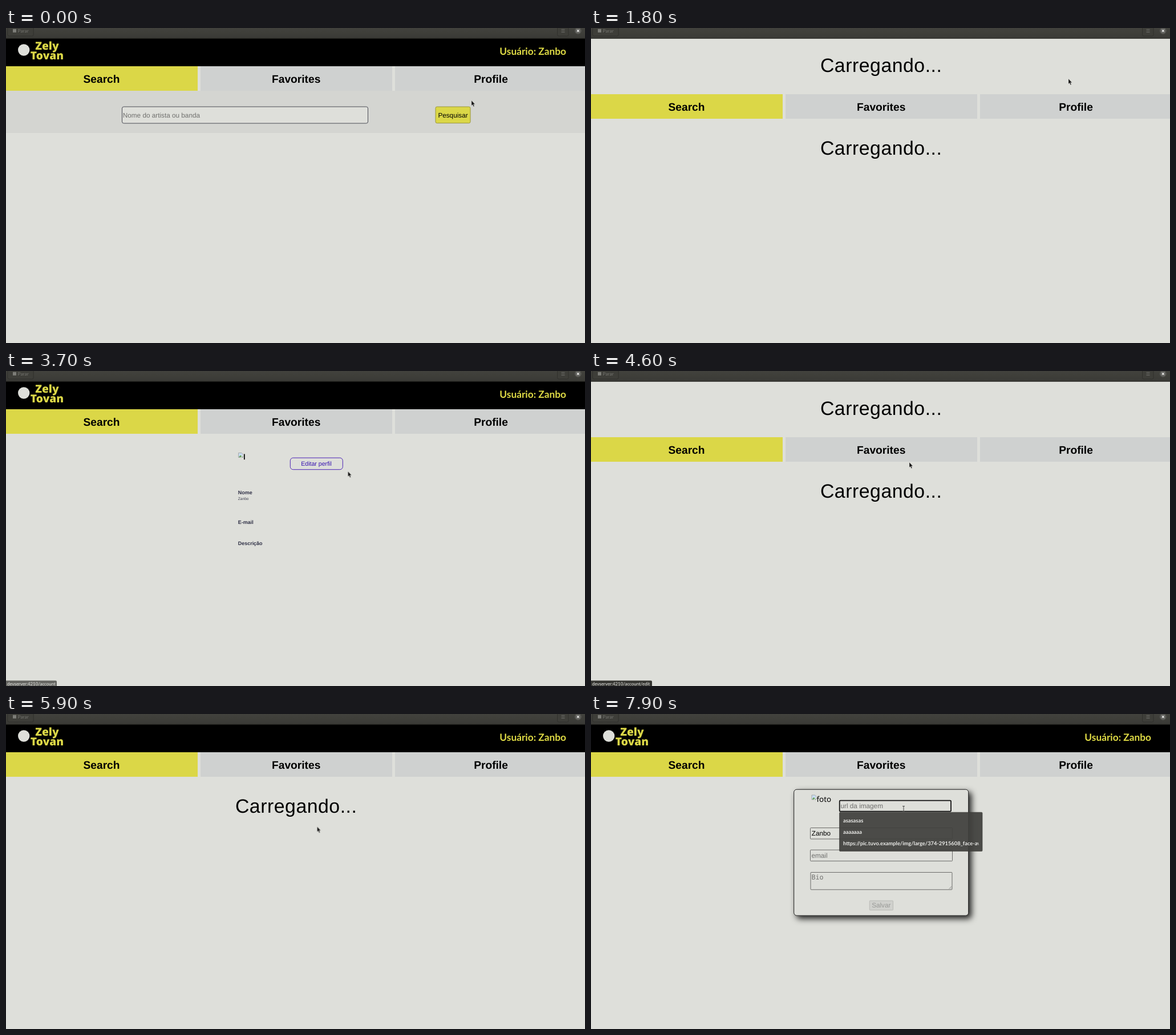
Recreate the animation shown at these times as an HTML page. Size 1015 by 552 pixels, loop 8000 ms.

```html
<!DOCTYPE html>
<html lang="pt">
<head>
<meta charset="utf-8">
<title>Perfil</title>
<style>
  html, body { margin: 0; width: 100%; height: 100%; overflow: hidden; background: #dedfda; }
  svg { display: block; width: 1015px; height: 552px; }
  text { font-family: "Liberation Sans", Arial, sans-serif; text-rendering: geometricPrecision; }
  .mid { text-anchor: middle; }
  .ui { font-family: Lato, "Open Sans", sans-serif; }
  .mark { font: 800 19.2px "Open Sans", sans-serif; fill: #dbd747; }
  .tab { font-size: 19.2px; font-weight: 700; }
  .loading { font-size: 33.8px; letter-spacing: .53px; }
  .field { font-size: 11.75px; }
  .hint { fill: #70706e; }
  .box { fill: none; stroke: #6b6b69; }
  .label { font-size: 8.95px; font-weight: 700; fill: #2e2f45; }
  .tip { font-size: 7.9px; fill: #ededeb; }
  .option { font-size: 9.3px; font-weight: 700; fill: #efefed; }
  .card { filter: drop-shadow(5.3px 5.3px 5.3px rgba(0, 0, 0, .85)); }

  /* One shared 8 s clock; 1.25% is 100 ms. */
  .anim { animation: 8s step-end infinite; }
  #header { animation-name: header; }
  #page { animation-name: page; }
  #wait-top { animation-name: waitTop; }
  #wait-page { animation-name: waitPage; }
  #search { animation-name: search; }
  #profile { animation-name: profile; }
  #edit { animation-name: edit; }
  #cover { animation-name: cover; }
  #block { animation-name: block; }
  #tip-profile { animation-name: tipProfile; }
  #tip-edit { animation-name: tipEdit; }
  #focus { animation-name: focus; }
  #caret { animation-name: caret; }
  #list { animation-name: list; }
  #pointer { animation-name: move; }
  #arrow { animation-name: arrow; }
  #beam { animation-name: beam; }

  @keyframes header { 0%, 35%, 73.75% { opacity: 1 } 17.5%, 57.5% { opacity: 0 } }
  @keyframes page {
    0%, 35%, 73.75% { transform: translateY(0) }
    17.5%, 57.5% { transform: translateY(49px) }
  }
  @keyframes waitTop { 0%, 35%, 73.75% { opacity: 0 } 17.5%, 57.5% { opacity: 1 } }
  @keyframes waitPage { 0%, 36.25%, 75% { opacity: 0 } 17.5%, 57.5% { opacity: 1 } }
  @keyframes search { 0% { opacity: 1 } 17.5%, 100% { opacity: 0 } }
  @keyframes profile { 0%, 57.5% { opacity: 0 } 36.25% { opacity: 1 } }
  @keyframes edit { 0% { opacity: 0 } 75%, 100% { opacity: 1 } }
  @keyframes cover { 0%, 82.5% { opacity: 0 } 75% { opacity: 1 } }
  @keyframes block {
    0% { x: 40px; width: 0 }
    78.75% { x: 40px; width: 9px }
    80% { x: 40px; width: 26.5px }
    81.25% { x: 40px; width: 64px }
    82.5% { x: 91px; width: 13px }
    85% { x: 98px; width: 6px }
    86.25%, 100% { x: 104px; width: 0 }
  }
  @keyframes tipProfile {
    0% { opacity: 0 } 3.75% { opacity: .2 } 5% { opacity: .45 } 6.25% { opacity: .7 }
    7.5% { opacity: .9 } 8.75% { opacity: 1 }
    20% { opacity: .7 } 21.25% { opacity: .35 } 22.5% { opacity: 0 }
    35% { opacity: .25 } 36.25% { opacity: .5 } 37.5% { opacity: .8 } 38.75% { opacity: 1 }
    46.25% { opacity: .72 } 47.5% { opacity: .35 } 48.75%, 100% { opacity: 0 }
  }
  @keyframes tipEdit {
    0%, 61.25% { opacity: 0 }
    48.75% { opacity: .45 } 50% { opacity: .8 } 51.25% { opacity: 1 }
  }
  @keyframes focus { 0% { opacity: 0 } 85%, 100% { opacity: 1 } }
  @keyframes caret { 0%, 90% { opacity: 0 } 85% { opacity: 1 } }
  @keyframes list { 0% { opacity: 0 } 85% { opacity: .5 } 86.25% { opacity: 1 } 98.75%, 100% { opacity: .93 } }
  @keyframes arrow { 0% { opacity: 1 } 80%, 100% { opacity: 0 } }
  @keyframes beam { 0% { opacity: 0 } 80%, 100% { opacity: 1 } }
  @keyframes move {
    0% { transform: translate(816px, 127px) }
    1.25% { transform: translate(820px, 116.5px) }
    3.75% { transform: translate(823px, 107px) }
    5% { transform: translate(828px, 100px) }
    6.25% { transform: translate(832px, 95px) }
    7.5% { transform: translate(835px, 91px) }
    8.75% { transform: translate(837px, 89px) }
    42.5% { transform: translate(760px, 130px) }
    43.75% { transform: translate(663px, 186px) }
    46.25% { transform: translate(599.5px, 176px) }
    47.5% { transform: translate(583px, 169px) }
    48.75% { transform: translate(570px, 164px) }
    50% { transform: translate(560px, 161px) }
    51.25% { transform: translate(554px, 159px) }
    55% { transform: translate(558px, 160px) }
    61.25% { transform: translate(538px, 176px) }
    63.75% { transform: translate(539px, 180px) }
    65% { transform: translate(540px, 185px) }
    66.25% { transform: translate(540.5px, 189px) }
    67.5% { transform: translate(541px, 192px) }
    73.75% { transform: translate(545.5px, 197.5px) }
    76.25% { transform: translate(546px, 194px) }
    77.5% { transform: translate(546px, 188px) }
    78.75% { transform: translate(546px, 183px) }
    80% { transform: translate(546px, 178.5px) }
    81.25% { transform: translate(547px, 168px) }
    82.5% { transform: translate(547px, 159px) }
    88.75% { transform: translate(548px, 162px) }
    90% { transform: translate(548px, 164px) }
    91.25%, 100% { transform: translate(548px, 166px) }
  }
</style>
</head>
<body>
<svg viewBox="0 0 1015 552">
  <defs>
    <linearGradient id="chrome" x2="0" y2="1">
      <stop stop-color="#42423d"/><stop offset="1" stop-color="#3a3a36"/>
    </linearGradient>
    <g id="broken">
      <path d="M.5 .5H6L8.5 3V8.500H.5Z" fill="#c9dcf0" stroke="#9b9d9c" stroke-width=".8"/>
      <path d="M1 8L4 4.500L8 8Z" fill="#5fa04f"/>
      <path d="M8.800 4.200L4.500 9" stroke="#dedfda" stroke-width="1.200"/>
    </g>
    <clipPath id="list-clip"><rect x="436" y="173" width="243.500" height="67"/></clipPath>
  </defs>

  <rect width="1015" height="552" fill="#dedfda"/>

  <g id="header" class="anim">
    <rect y="18" width="1015" height="49" fill="#000"/>
    <circle cx="31.200" cy="38.500" r="10.200" fill="#dedfda"/>
    <text class="mark mid" x="72" y="38">Zely</text>
    <text class="mark mid" x="72" y="55">Tovan</text>
    <rect id="cover" class="anim" x="40" y="19" width="64" height="44" fill="#000"/>
    <rect id="block" class="anim" x="40" y="19" width="0" height="39.500" fill="#dbd747"/>
    <text class="ui" x="982" y="46.500" text-anchor="end" font-size="17.300" font-weight="700" fill="#dfdb45">Usuário: Zanbo</text>
  </g>

  <text id="wait-top" class="anim loading" x="401.900" y="77">Carregando...</text>

  <g id="page" class="anim">
    <rect y="67" width="336" height="43" fill="#dbd747"/>
    <rect x="341" y="67" width="336" height="43" fill="#cfd1d0"/>
    <rect x="682" y="67" width="333" height="43" fill="#cfd1d0"/>
    <text class="tab mid" x="167.500" y="95.600">Search</text>
    <text class="tab mid" x="508.700" y="95.600">Favorites</text>
    <text class="tab mid" x="850" y="95.600">Profile</text>
    <text id="wait-page" class="anim loading" x="401.900" y="173">Carregando...</text>
  </g>

  <g id="search" class="anim">
    <rect y="110" width="1015" height="74" fill="#d4d5d1"/>
    <rect x="203.500" y="138" width="431" height="29" rx="3" fill="#dedfda" stroke="#4b4c55"/>
    <text class="field hint" x="204.800" y="156.500">Nome do artista ou banda</text>
    <rect x="753" y="138" width="61" height="28.700" rx="2.500" fill="#dbd747" stroke="#98963c"/>
    <text class="field mid" x="783.500" y="156.500">Pesquisar</text>
  </g>

  <g id="profile" class="anim">
    <use href="#broken" x="407" y="143"/>
    <rect x="417" y="145.500" width="1.700" height="9.700"/>
    <rect x="498.300" y="152.200" width="92" height="20.500" rx="5" fill="none" stroke="#4a20b4"/>
    <text class="mid" x="544" y="165.800" font-size="10.600" fill="#3510b0">Editar perfil</text>
    <text class="label" x="406.800" y="215.500">Nome</text>
    <text x="406.800" y="226" font-size="6.600" fill="#3b3c4c">Zanbo</text>
    <text class="label" x="406.800" y="267.900">E-mail</text>
    <text class="label" x="406.800" y="305.300">Descrição</text>
  </g>

  <g id="edit" class="anim">
    <rect class="card" x="355.700" y="132.200" width="306" height="221" rx="5" fill="#dedfda" stroke="#1d1d1d"/>
    <use href="#broken" x="386.500" y="141.500"/>
    <text x="395.500" y="154" font-size="13.400" style="font-family:'Noto Sans','Open Sans',sans-serif">foto</text>

    <rect class="box" x="435.700" y="151.500" width="195.500" height="19.500" rx="1"/>
    <text class="field hint" x="437.500" y="165">url da imagem</text>
    <rect class="box" x="384.500" y="199.500" width="249" height="19.500" rx="1"/>
    <text class="field" x="386.800" y="213.200">Zanbo</text>
    <rect class="box" x="384.500" y="238.200" width="249" height="19.500" rx="1"/>
    <text class="field hint" x="386.500" y="251.800">email</text>
    <rect class="box" x="385" y="277.500" width="248" height="30.300" rx="1"/>
    <text class="hint" x="386.500" y="290" font-size="11.700" style="font-family:'DejaVu Sans Mono',monospace">Bio</text>
    <path d="M627.500 306.500L632 302M630 306.500L632 304.500" stroke="#777" stroke-width=".7"/>
    <rect x="488.300" y="327.200" width="41.200" height="16.500" rx="1" fill="#d0d1cd" stroke="#b9bab6"/>
    <text class="field mid" x="508.800" y="339.300" fill="#999a97">Salvar</text>

    <g id="focus" class="anim">
      <rect x="435.700" y="151.700" width="195.300" height="19" rx="1.500" fill="none" stroke="#101010" stroke-width="1.700"/>
      <rect id="caret" class="anim" x="437.700" y="154.500" width=".8" height="13.500"/>
    </g>
  </g>

  <g id="pointer" class="anim">
    <path id="arrow" class="anim" d="M0 0V9L2 7.200L3.500 10.700L5 10L3.500 6.700H6.200Z" fill="#161616" stroke="#d8d8d4" stroke-width=".4"/>
    <path id="beam" class="anim" d="M-2 -4.500H2M0 -4.500V4.500M-2 4.500H2" fill="none" stroke="#3c3c3a" stroke-width=".9"/>
  </g>

  <g id="list" class="anim">
    <rect x="435.500" y="172.300" width="250.500" height="68.300" rx="1.500" fill="#40403d" stroke="#353532" stroke-width=".7"/>
    <g clip-path="url(#list-clip)">
      <text class="ui option" x="442" y="190">asasasas</text>
      <text class="ui option" x="442" y="209.700">aaaaaaa</text>
      <text class="ui option" x="442" y="229.500">https://pic.tuvo.example/img/large/374-2915608_face-av</text>
    </g>
  </g>

  <g id="tip-profile" class="anim">
    <path d="M0 542.500H87Q89 542.500 89 544.500V552H0Z" fill="#363632"/>
    <text class="ui tip" x="2" y="551">devserver:4210/account</text>
  </g>
  <g id="tip-edit" class="anim">
    <path d="M0 542.500H105Q107 542.500 107 544.500V552H0Z" fill="#363632"/>
    <text class="ui tip" x="2" y="551">devserver:4210/account/edit</text>
  </g>

  <g>
    <rect width="1015" height="18" fill="url(#chrome)"/>
    <rect y="17.700" width="1015" height="1.100" fill="#272724"/>
    <rect x="2.800" y="-5" width="45.400" height="19" rx="2.500" fill="#3e3e39" stroke="#30302c"/>
    <rect x="12" y="1.800" width="6" height="6" fill="#7d7d78"/>
    <text class="ui" x="20.500" y="8" font-size="8.400" fill="#74746f">Parar</text>
    <rect x="966.500" y="-5" width="19.500" height="19" rx="2.500" fill="#3e3e39" stroke="#30302c"/>
    <path d="M973.500 2.500H979.500M973.500 5H979.500M973.500 7.500H979.500" stroke="#6f6f6a" stroke-width=".9"/>
    <circle cx="1002.800" cy="5" r="5.800" fill="#5b5b57"/>
    <path d="M1000.800 3L1004.800 7M1004.800 3L1000.800 7" stroke="#f0f0ee" stroke-width="1.200"/>
  </g>
</svg>
</body>
</html>
```
